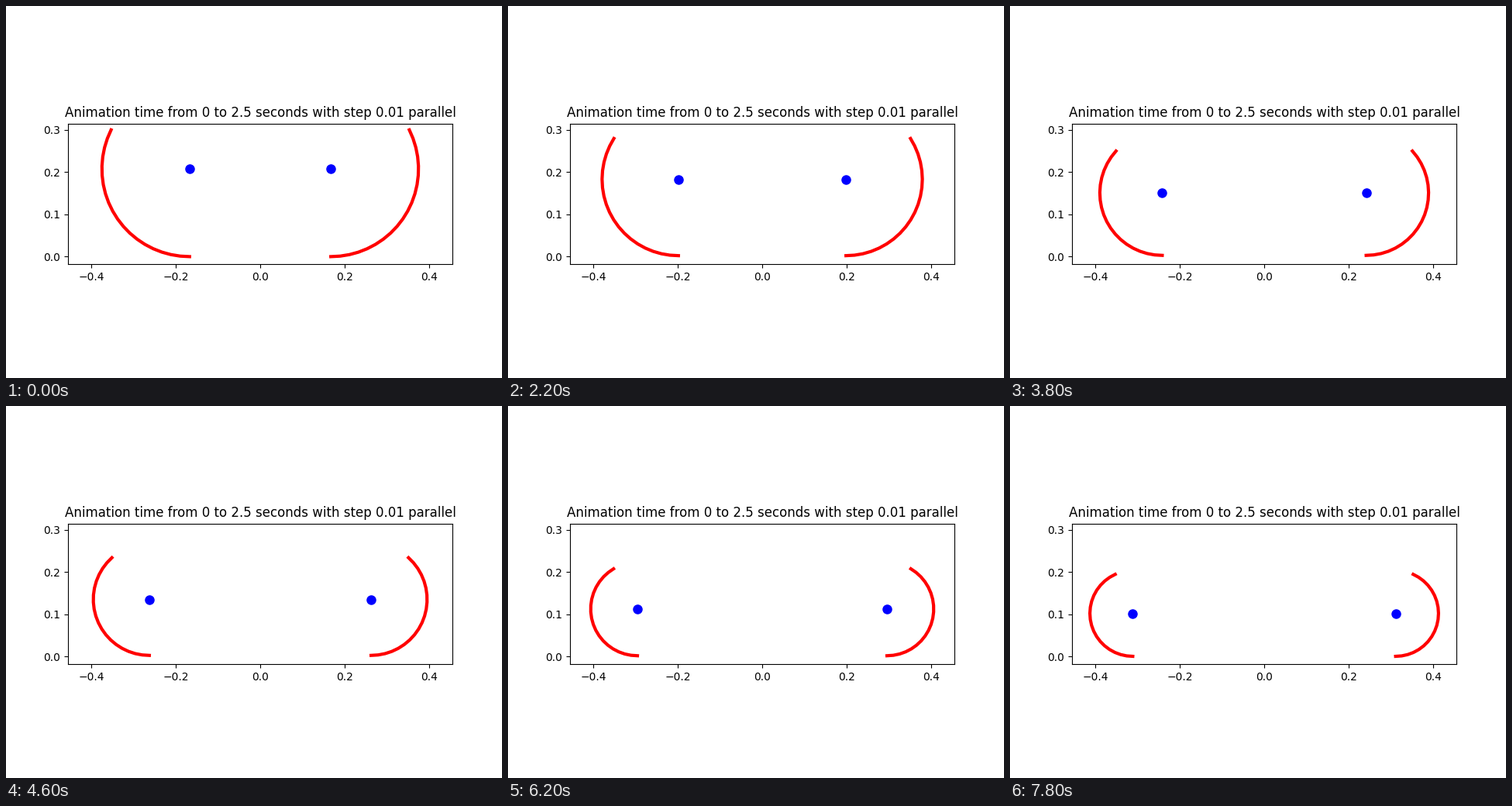
These frames come from a looping animation (640x480 px, 8 s). A matplotlib script:

```python
import numpy as np
import matplotlib.pyplot as plt
from matplotlib.animation import FuncAnimation

# A membrane of fixed length holds up a falling load under air pressure.
LENGTH = 3 * np.pi / 8
EDGE = 0.353          # half width of the load
START = 0.3           # starting height
PRESSURE, MASS, G = 2000, 100, 9.81
DT = 0.01
FRAMES, INTERVAL = 40, 200
LAG = 0.75            # the radius runs a little ahead of the centre

angles = np.linspace(0.3, 1.5, 6000)
radii = (LENGTH / 2 - EDGE) / (np.pi / 2 + angles - np.cos(angles))
heights = radii * (1 + np.sin(angles))


def shape(height):
    """Centre x, radius and end angle of the right-hand arc."""
    angle = np.interp(-height, -heights, angles)
    radius = height / (1 + np.sin(angle))
    return EDGE - radius * np.cos(angle), radius, angle


def simulate():
    height, speed = START, 0.0
    states = []
    for _ in range(FRAMES):
        x, radius, angle = shape(height)
        states.append((x, radius, angle, radius + LAG * speed * DT))
        speed += DT * (PRESSURE * 2 * x / MASS - G)
        height += DT * speed
    return states


states = simulate()

fig, ax = plt.subplots(figsize=(6.4, 4.8), dpi=100)
ax.set_aspect("equal")
ax.set_xlim(-0.455, 0.455)
ax.set_ylim(-0.0180, 0.3151)
ax.set_xticks([-0.4, -0.2, 0.0, 0.2, 0.4])
ax.set_yticks([0.0, 0.1, 0.2, 0.3])
ax.set_title("Animation time from 0 to 2.5 seconds with step 0.01 parallel")

arcs = [ax.plot([], [], color="red", lw=3)[0] for _ in range(2)]
dots, = ax.plot([], [], "o", color="blue", markersize=8)


def update(i):
    x, y, angle, radius = states[i]
    t = np.linspace(-np.pi / 2, angle, 20)
    for arc, side in zip(arcs, (-1, 1)):
        arc.set_data(side * (x + radius * np.cos(t)), y + radius * np.sin(t))
    dots.set_data([-x, x], [y, y])
    return [*arcs, dots]


anim = FuncAnimation(fig, update, frames=FRAMES, interval=INTERVAL,
                     init_func=lambda: update(0), repeat=True, repeat_delay=0)
plt.show()
```
